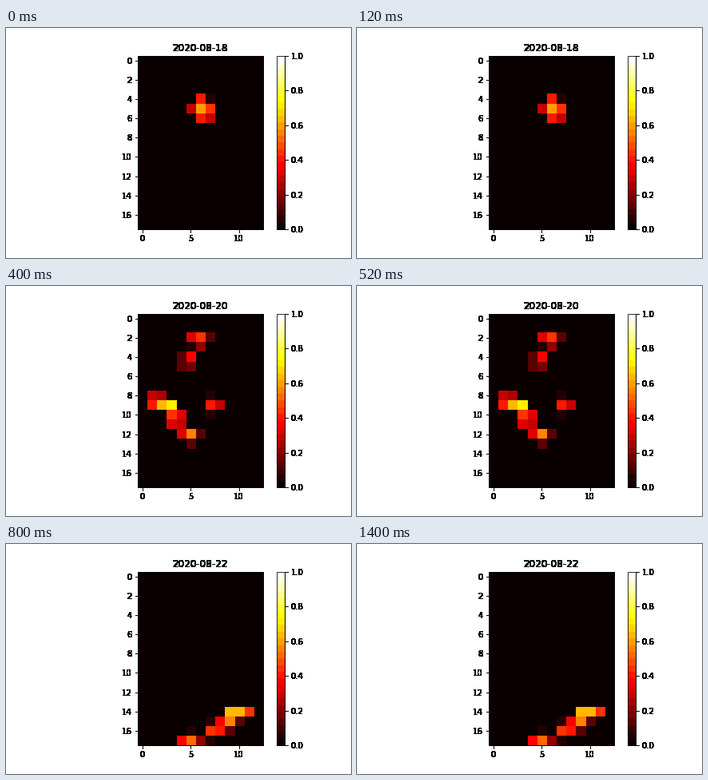
Recreate the animation shown at these times as a matplotlib script. Size 432 by 288 pixels, loop 1800 ms.

```python
import matplotlib.pyplot as plt
import numpy as np
from matplotlib.animation import FuncAnimation

ROWS, COLS = 18, 13
STEP_MS, STEPS = 200, 9
REACH = 1.15  # how far a trail spreads, in cells
FLOOR = 0.04  # weaker heat is dropped

plt.rcParams.update({
    "font.family": "DejaVu Sans",
    "font.size": 10,
    "figure.subplot.bottom": 0.125,
    "figure.subplot.top": 0.88,
})

# Each day is a few trails: start (x, y), end (x, y), heat at both ends.
DAYS = [
    [((6.1, 4.4), (6.4, 5.7), (.52, .55)),
     ((5.7, 5.0), (6.6, 5.2), (.60, .56))],

    [((5.5, 3.0), (7.2, 4.2), (.28, .38)),
     ((5.0, 5.0), (5.2, 6.2), (.28, .30)),
     ((7.7, 5.0), (7.7, 6.0), (.28, .28)),
     ((4.0, 7.0), (6.0, 6.7), (.26, .45)),
     ((8.0, 8.0), (7.3, 10.), (.37, .46)),
     ((4.0, 9.4), (4.6, 10.5), (.42, .46)),
     ((5.4, 10.), (6.1, 11.), (.70, .90))],

    [((5.3, 2.1), (6.2, 2.3), (.35, .50)),
     ((4.8, 4.0), (4.5, 5.0), (.38, .20)),
     ((1.4, 8.6), (2.8, 9.1), (.60, .76)),
     ((3.4, 10.), (3.5, 11.), (.52, .42)),
     ((4.1, 12.), (5.1, 12.1), (.34, .60)),
     ((7.1, 9.0), (8.0, 9.0), (.40, .30))],

    [((1.4, 7.0), (1.4, 7.3), (.52, .42)),
     ((0.8, 8.0), (1.5, 9.0), (.28, .28)),
     ((6.4, 11.9), (8.2, 11.3), (.60, .65)),
     ((7.2, 12.), (7.4, 15.5), (.90, .15)),
     ((2.9, 15.), (3.0, 16.), (.16, .15))],

    [((9.2, 14.2), (10.5, 14.), (.68, .60)),
     ((7.2, 16.), (9.0, 15.), (.47, .54)),
     ((4.3, 17.), (5.2, 17.), (.40, .55))],
]


def trail(start, end, heat):
    """Heat on the grid that fades with distance from a line segment."""
    y, x = np.mgrid[:ROWS, :COLS]
    (x0, y0), (x1, y1) = start, end
    dx, dy = x1 - x0, y1 - y0
    t = np.clip(((x - x0) * dx + (y - y0) * dy) / (dx**2 + dy**2), 0, 1)
    dist = np.hypot(x - x0 - t * dx, y - y0 - t * dy)
    fade = np.clip(1 - (dist / REACH)**2, 0, 1)**1.5
    return np.interp(t, (0, 1), heat) * fade


def heat_map(trails):
    grid = np.max([trail(*t) for t in trails], axis=0)
    return np.where(grid < FLOOR, 0, grid)


def harden(img, dpi):
    """Make every touched pixel opaque, giving crisp, heavy text and ticks."""
    out = np.rint(img * 255).astype(np.uint8)
    out[..., 3] = np.where(out[..., 3] > 0, 255, 0)
    return out, 0, 0


maps = [heat_map(d) for d in DAYS]

fig, ax = plt.subplots(figsize=(6, 4), dpi=72, facecolor="white")
im = ax.imshow(maps[0], cmap=plt.get_cmap("hot", 26), vmin=0, vmax=1)
ax.set_xticks(range(0, COLS, 5))
ax.set_yticks(range(0, ROWS, 2))
title = ax.set_title("", x=0.498)
bar = fig.colorbar(im, ax=ax, ticks=np.linspace(0, 1, 6))

for a in (ax, bar.ax):
    a.set_agg_filter(harden)


def update(i):
    day = min(i, len(maps) - 1)  # the last day is held
    im.set_data(maps[day])
    title.set_text(f"2020-08-{18 + day}")
    return im, title


anim = FuncAnimation(fig, update, frames=STEPS, interval=STEP_MS,
                     repeat=True, repeat_delay=0, blit=False)
plt.show()
```
